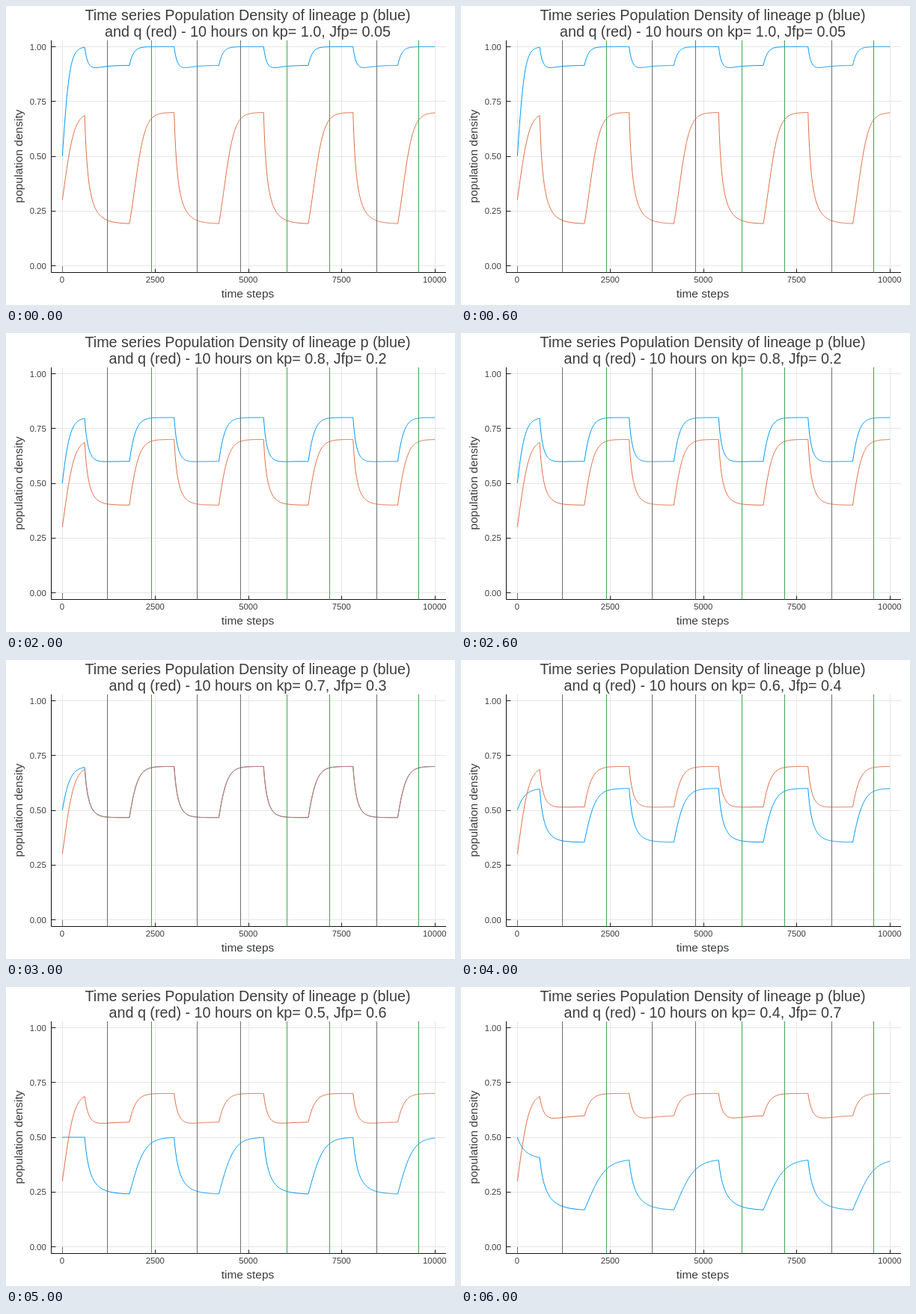
Recreate the animation shown at these times as an HTML page. Size 600 by 400 pixels, loop 7 s.

```html
<!DOCTYPE html>
<html lang="en">
<head>
<meta charset="utf-8">
<title>Population density</title>
<style>
  html, body { margin: 0; width: 100%; height: 100%; overflow: hidden; background: #fff; }
  svg { display: block; }
  text { font-family: "Liberation Sans", Arial, sans-serif; fill: #3c3c3c; text-anchor: middle; }
  path { fill: none; stroke-width: 1; }
  .title { font-size: 19.76px; }
  .guide { font-size: 15.5px; }
  .tick { font-size: 11.3px; }
  .tick.left { text-anchor: end; }
</style>
</head>
<body>
<svg id="plot" width="600" height="400" viewBox="0 0 600 400"></svg>
<script>
const plot = document.getElementById("plot");
const TOP = 46, BOTTOM = 356.5, LEFT = 60.5, RIGHT = 588;
const STEPS = 10000, CAPACITY_Q = 0.7, FLUX_Q = 0.3, RATE = 0.01;
const SCENES = [[1, 0.05], [0.9, 0.1], [0.8, 0.2], [0.7, 0.3], [0.6, 0.4], [0.5, 0.6], [0.4, 0.7]];
const GREEN = "#3da44d", GRAY = "#6c706c";

const toX = step => 75.3 + step * 0.0498;
const toY = density => 347.5 - density * 293;
const snap = v => Math.floor(v) + 0.5;

function add(tag, attrs, content = "") {
  const node = document.createElementNS("http://www.w3.org/2000/svg", tag);
  for (const key in attrs) node.setAttribute(key, attrs[key]);
  node.textContent = content;
  return plot.appendChild(node);
}
const line = (d, stroke) => add("path", { d, stroke });
const label = (cls, x, y, content, extra) => add("text", { class: cls, x, y, ...extra }, content);

// Logistic growth of both lineages; they compete during alternate 1200-step phases.
function simulate(capacityP, fluxP) {
  let p = 0.5, q = 0.3, pathP = "", pathQ = "";
  for (let step = 0; step <= STEPS; step++) {
    if (step % 20 === 0) {
      const start = (step ? "L" : "M") + toX(step).toFixed(2) + " ";
      pathP += start + toY(p).toFixed(2);
      pathQ += start + toY(q).toFixed(2);
    }
    const competing = step >= 600 && (step - 600) % 2400 < 1200;
    const share = fluxP * p / (fluxP * p + FLUX_Q * q);
    const lossP = competing ? share * q : 0;
    const lossQ = competing ? (1 - share) * p : 0;
    const dp = RATE * p * (capacityP - p - lossP);
    const dq = RATE * q * (CAPACITY_Q - q - lossQ);
    p += dp;
    q += dq;
  }
  return [pathP, pathQ];
}

const xTicks = [0, 2500, 5000, 7500, 10000];
const yTicks = [0, 0.25, 0.5, 0.75, 1];
for (const t of xTicks) line(`M${snap(toX(t))} ${TOP}V${BOTTOM}`, "#e6e6e6");
for (const d of yTicks) line(`M${LEFT} ${snap(toY(d))}H${RIGHT}`, "#e6e6e6");
for (const t of xTicks) {
  line(`M${snap(toX(t))} ${BOTTOM}v-5`, "#222");
  label("tick", toX(t) - 0.5, 370, t);
}
for (const d of yTicks) {
  line(`M${LEFT} ${snap(toY(d))}h6`, "#222");
  label("tick left", 53.7, toY(d) + 4, d.toFixed(2));
}
line(`M${LEFT} ${TOP}V${BOTTOM}H${RIGHT}`, "#111");

const curveP = line("", "#009afa");
const curveQ = line("", "#e36f47");

line(`M75.5 348V${BOTTOM}`, GRAY);
for (const x of [135.5, 255.5, 313.5, 495.5]) line(`M${x} ${TOP}V${BOTTOM}`, GRAY);
for (const x of [194.5, 375.5, 432.5, 551.5]) line(`M${x} ${TOP}V${BOTTOM}`, GREEN);

label("title", 323, 19, "Time series Population Density of lineage p (blue)");
const subtitle = label("title", 323, 41, "");
label("guide", 323, 390, "time steps");
label("guide", 0, 0, "population density", { transform: "translate(22 201) rotate(-90)" });

const scenes = SCENES.map(([capacity, flux]) => ({
  paths: simulate(capacity, flux),
  text: `and q (red) - 10 hours on kp= ${capacity.toFixed(1)}, Jfp= ${flux}`
}));

let shown = -1;
function draw() {
  const index = Math.floor(performance.now() / 1000) % scenes.length;
  if (index !== shown) {
    shown = index;
    const { paths, text } = scenes[index];
    curveP.setAttribute("d", paths[0]);
    curveQ.setAttribute("d", paths[1]);
    subtitle.textContent = text;
  }
  requestAnimationFrame(draw);
}
draw();
</script>
</body>
</html>
```
